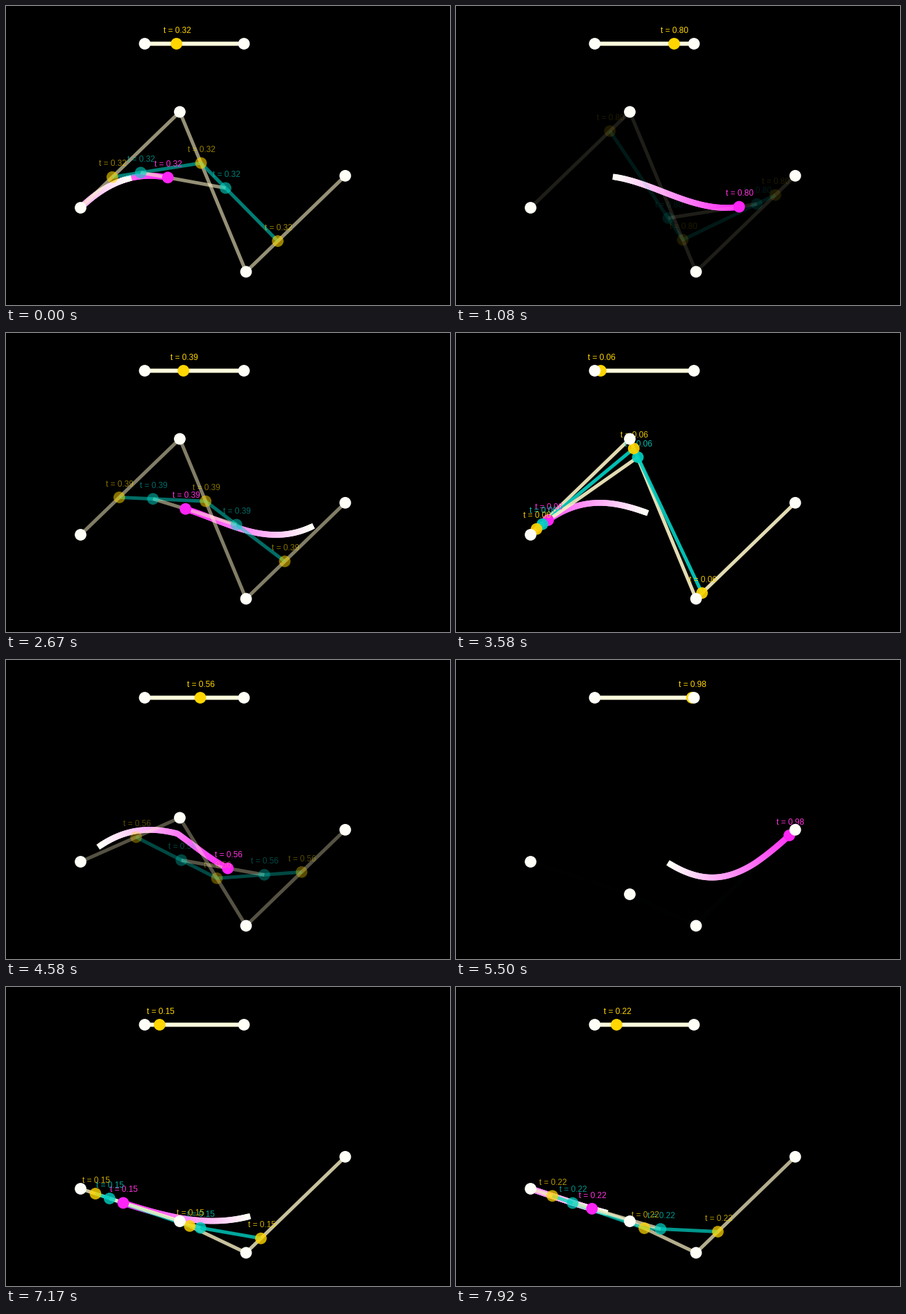
A matplotlib script for the animation above (8000 ms loop, 640 px wide and 432 px high).

```python
import matplotlib.pyplot as plt
import numpy as np
from matplotlib.animation import FuncAnimation
from matplotlib.collections import LineCollection
from matplotlib.patches import Circle

W, H, DPI = 640, 432, 100
PT = 72 / DPI
TICKS, TICK_MS = 200, 40
STEPS_PER_TICK = 12 * TICK_MS / 1000   # the picture steps 12 times a second
TRAIL, SAMPLES = 0.5, 70

WHITE = np.array([255, 255, 248]) / 255
CREAM = np.array([248, 240, 196]) / 255
BAR = np.array([255, 252, 222]) / 255
GOLD = np.array([255, 214, 0]) / 255
TEAL = np.array([0, 208, 194]) / 255
PINK = np.array([255, 36, 246]) / 255
PINK_TEXT = np.array([255, 50, 220]) / 255

# Sweep progress: each whole unit is one pass along the curve.
KEY_STEPS = [-12, 0, 2, 13, 32, 43, 55, 77, 95]
KEY_SWEEP = [-0.18, 0.32, 0.35, 0.80, 1.61, 2.06, 2.56, 3.48, 4.22]

fig = plt.figure(figsize=(W / DPI, H / DPI), dpi=DPI, facecolor="black")
ax = fig.add_axes([0, 0, 1, 1])


def ping_pong(u):
    return 1 - abs(1 - u % 2)


def controls(n):
    y = np.interp(n, [50.15, 62.15], [153, 338.5])
    return np.array([[107.5, 291.5], [250.5, y], [346, 384], [489, 245.3]])


def reduce_points(pts, t):
    return pts[:-1] + (pts[1:] - pts[:-1]) * t


def curve_point(n, t):
    pts = controls(n)
    while len(pts) > 1:
        pts = reduce_points(pts, t)
    return pts[0]


def line(pts, color, alpha, z, width=5):
    ax.plot(pts[:, 0], pts[:, 1], color=color, alpha=alpha, lw=width * PT,
            solid_capstyle="butt", solid_joinstyle="round", snap=False,
            zorder=z)


def dots(pts, color, alpha, z):
    for p in pts:
        ax.add_patch(Circle(p, 8.4, fc=color, ec="none", alpha=alpha, zorder=z))


def labels(pts, t, color, alpha, z):
    for x, y in pts:
        ax.text(x + 1, y - 15.8, f"t = {t:.2f}", color=color, alpha=alpha,
                family="Liberation Sans", size=11.9 * PT, ha="center",
                va="baseline", zorder=z)


def trail(u):
    past = np.linspace(u, u - TRAIL, SAMPLES)
    when = np.interp(past, KEY_SWEEP, KEY_STEPS)
    pts = np.array([curve_point(n, ping_pong(v)) for n, v in zip(when, past)])
    parts = [pts[i:i + 3] for i in range(SAMPLES - 2)]
    mix = np.linspace(0, 1, len(parts))[:, None]
    ax.add_collection(LineCollection(
        parts, colors=PINK * (1 - mix) + WHITE * mix, linewidths=8.6 * PT,
        capstyle="butt", zorder=1))


def slider(t):
    ends = np.array([[200, 54.5], [343, 54.5]])
    knob = reduce_points(ends, t)
    line(ends, BAR, 1, 2, 6)
    dots(knob, GOLD, 1, 6)
    dots(ends, WHITE, 1, 8)
    labels(knob, t, GOLD, 1, 7)


def draw(tick):
    n = int(tick * STEPS_PER_TICK + 0.45)
    ax.clear()
    ax.set_xlim(0, W)
    ax.set_ylim(H, 0)
    ax.axis("off")

    u = np.interp(n, KEY_STEPS, KEY_SWEEP)
    t = ping_pong(u)
    fade = (1 - t) ** 1.3
    corners = controls(n)
    first = reduce_points(corners, t)
    second = reduce_points(first, t)
    tip = reduce_points(second, t)

    slider(t)
    trail(u)
    line(corners, CREAM, fade, 2)
    line(first, TEAL, fade, 3)
    line(second, CREAM, fade, 3.5)
    for z, pts, color, ink, alpha in ((4, tip, PINK, PINK_TEXT, 1),
                                      (5, second, TEAL, TEAL, fade),
                                      (6, first, GOLD, GOLD, fade)):
        dots(pts, color, alpha, z)
        labels(pts, t, ink, alpha, z + 0.5)
    dots(corners, WHITE, 1, 8)
    return []


anim = FuncAnimation(fig, draw, frames=TICKS, interval=TICK_MS,
                     init_func=lambda: draw(0), repeat=True, repeat_delay=0)
plt.show()
```
